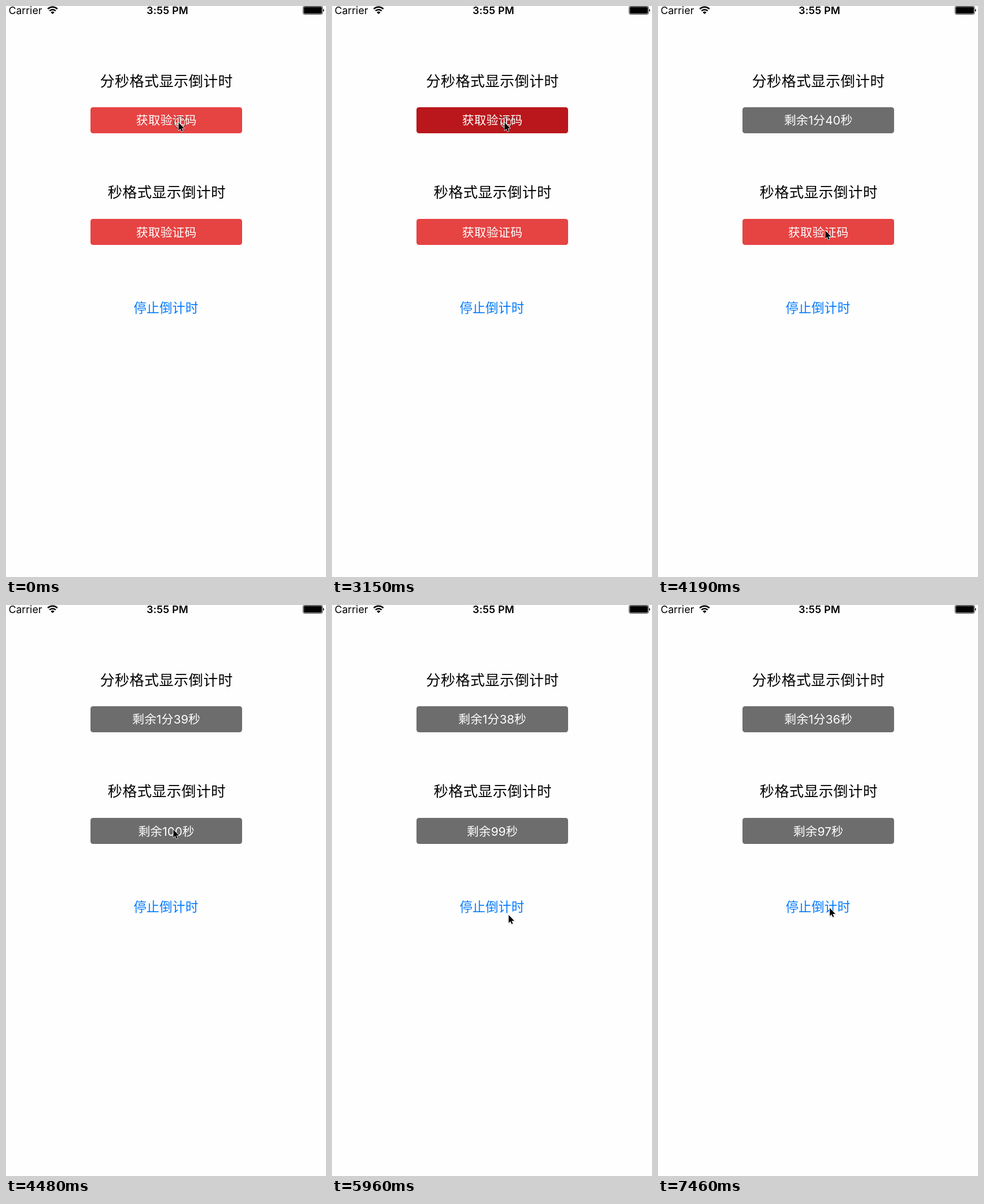
An HTML page that plays this animation: 553x987 px, repeating every 8000 ms.

```html
<!DOCTYPE html>
<html lang="zh-CN">
<head>
<meta charset="utf-8">
<title>倒计时</title>
<style>
  html, body { margin: 0; width: 100%; height: 100%; overflow: hidden; background: #fefefe; }
  svg { display: block; width: 553px; height: 987px; }
  text { font-family: Inter, "Noto Sans CJK SC", "Noto Sans CJK", sans-serif; font-weight: 350; }
  .mid { text-anchor: middle; }
  .title { font-size: 25.1px; letter-spacing: .4px; }
  .label { font-size: 20.7px; letter-spacing: .2px; fill: #fff; }
  .num { font-weight: 400; letter-spacing: 0; }
  .stop { font-size: 22.2px; letter-spacing: .2px; fill: #007aff; }
  .bar { font-size: 17.7px; font-weight: 400; }
  .clock { font-weight: 600; letter-spacing: .2px; }
</style>
</head>
<body>
<svg viewBox="0 0 553 987">
  <rect width="553" height="987" fill="#fefefe"/>

  <text class="bar" x="4.5" y="14">Carrier</text>
  <g fill="none" stroke="#000" stroke-width="2.5">
    <path d="M72.2 5.1A12 12 0 0 1 88.8 5.1"/>
    <path d="M75.2 8.4A7.6 7.6 0 0 1 85.8 8.4"/>
    <path d="M80.5 14L77.4 10.9A4.4 4.4 0 0 1 83.6 10.9Z" fill="#000" stroke="none"/>
  </g>
  <text class="bar clock mid" x="279" y="14">3:55 PM</text>
  <rect x="513.4" y=".4" width="33.6" height="14" rx="2.6" fill="none" stroke="#000" stroke-width=".8"/>
  <rect x="514.6" y="1.6" width="31.2" height="11.6" rx="1.6"/>
  <path d="M548 5A2.6 2.6 0 0 1 548 9.8Z"/>

  <text class="title mid" x="277.2" y="139.2">分秒格式显示倒计时</text>
  <rect id="box1" x="146" y="175" width="262" height="45" rx="4.4"/>
  <text id="label1" class="label mid" x="277.1" y="205.4"></text>

  <text class="title mid" x="277.7" y="331.2">秒格式显示倒计时</text>
  <rect id="box2" x="146" y="368" width="262" height="45" rx="4.4"/>
  <text id="label2" class="label mid" x="277.1" y="398.5"></text>

  <text class="stop mid" x="276.4" y="530.3">停止倒计时</text>

  <g id="pointer">
    <g id="ring" fill="none">
      <circle cx="3.5" cy="1" r="9.9" stroke="#000"/>
      <circle cx="3.5" cy="1" r="8.9" stroke="#fff" stroke-width="1.1"/>
    </g>
    <path d="M1.5 2V15.8L4.7 12.8L6.8 17.6L9 16.6L6.9 12H11.8Z" opacity=".16" stroke="#000" stroke-width="1.2"/>
    <path d="M1.3 .8V14.6L4.4 11.7L6.5 16.5L8.5 15.6L6.5 11H11Z" stroke="#fff" stroke-width="1.4" paint-order="stroke" stroke-linejoin="round"/>
  </g>
</svg>
<script>
  const LOOP = 8000;
  const RED = '#e64343', DARK = '#b9171b', GREY = '#6d6d6d';
  const IDLE = '获取验证码';
  const $ = id => document.getElementById(id);
  const num = n => `<tspan class="num">${n}</tspan>`;

  // Pointer stops: time, x, y
  const path = [
    [0, 297, 200.5], [3590, 296, 203], [3740, 307, 268], [3890, 313, 356.5],
    [4040, 297, 382], [4190, 288, 387.5], [5080, 310, 492.5], [5230, 326, 527],
    [5380, 326, 528], [5820, 326.5, 530], [5960, 304, 535], [6110, 300, 536],
    [6260, 296, 529], [6410, 295.5, 523]
  ];

  const buttons = [
    { id: 1, press: 3150, ticks: [3290, 4330, 5380, 6260, 7310],
      format: s => `剩余${num(Math.floor(s / 60))}分${num(s % 60)}秒` },
    { id: 2, press: 4330, ticks: [4480, 5520, 6560, 7460],
      format: s => `剩余${num(s)}秒` }
  ];

  function drawButton(button, t) {
    const { id, press, ticks, format } = button;
    const passed = ticks.filter(at => at <= t).length;
    $('box' + id).setAttribute('fill', passed ? GREY : t >= press ? DARK : RED);
    if (button.shown === passed) return;
    button.shown = passed;
    $('label' + id).innerHTML = passed ? format(101 - passed) : IDLE;
  }

  function draw(now) {
    const t = now % LOOP;
    buttons.forEach(b => drawButton(b, t));
    const [, x, y] = path.filter(p => p[0] <= t).pop();
    $('pointer').setAttribute('transform', `translate(${x} ${y})`);
    const down = t < 150 || buttons.some(b => t >= b.press && t < b.ticks[0]);
    $('ring').setAttribute('visibility', down ? 'visible' : 'hidden');
  }

  const start = performance.now();
  function frame() {
    draw(performance.now() - start);
    requestAnimationFrame(frame);
  }
  frame();
</script>
</body>
</html>
```
